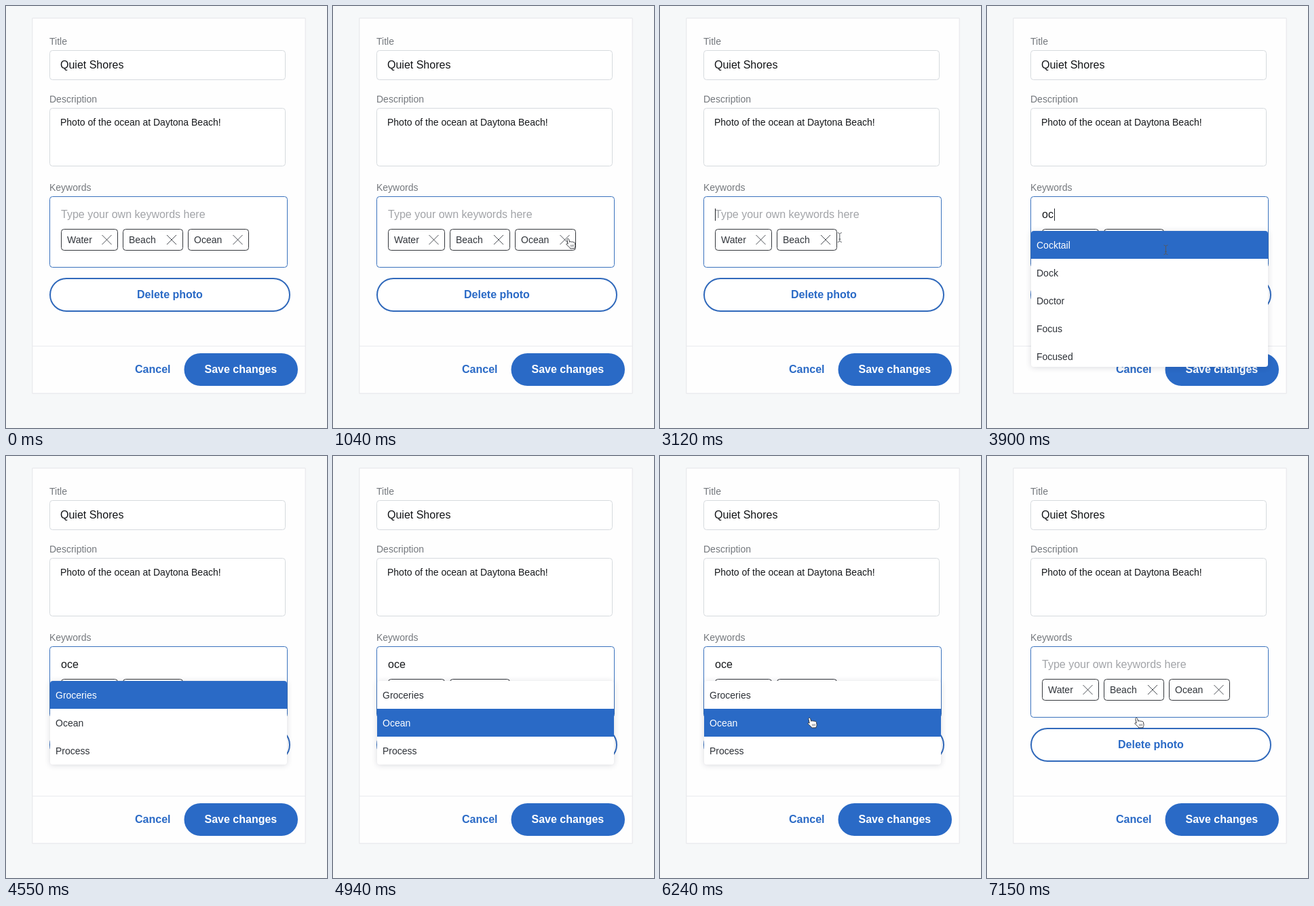
Write an HTML page with a canvas that moves like this. It is 473 px wide and 621 px high and loops after 7.28 s.

```html
<!DOCTYPE html>
<html lang="en">
<head>
<meta charset="utf-8">
<title>Photo keywords</title>
<style>
  html, body { margin: 0; width: 100%; height: 100%; overflow: hidden; background: #f6f8f9; }
  canvas { display: block; width: 473px; height: 621px; }
</style>
</head>
<body>
<canvas id="stage"></canvas>
<script>
const W = 473, H = 621, LOOP = 7280, STEP = 130;
const BLUE = '#2a6ac6';
const FONT = '"Liberation Sans", Arial, sans-serif';
const canvas = document.getElementById('stage');
const ctx = canvas.getContext('2d');
const dpr = window.devicePixelRatio || 1;
canvas.width = W * dpr;
canvas.height = H * dpr;

// Each entry holds from its time until the next one.
const TYPED = [[0, ''], [3510, 'o'], [3640, 'oc'], [4030, 'oce'], [6370, '']];
const CARET = [[0, false], [2080, true], [2600, false], [3120, true], [4550, false],
  [5070, true], [5590, false]];
const LISTS = [[0, null],
  [3900, ['Cocktail', 'Dock', 'Doctor', 'Focus', 'Focused']],
  [4160, ['Groceries', 'Ocean', 'Process']],
  [6370, null]];
const POINTER = [[0, 'none'], [520, 'arrow'], [1040, 'hand'], [1430, 'arrow'],
  [1950, 'beam'], [4030, 'none'], [5460, 'hand']];
const MOVES = [[520, 424, 412], [1040, 343, 341], [1690, 343, 341], [2080, 267, 304],
  [5330, 262, 372], [6110, 217, 384]];

const HAND = new Path2D('M3.2 9.2L1.9 3.2C1.5 1.2 3.9.5 4.6 2.4L5.8 6.4C6.4 5.3 8 5.4 8.4 6.4' +
  'C9.1 5.5 10.5 5.7 10.9 6.8C11.9 6.1 13.2 6.7 13.5 8.2L14 11.4C14.1 13 13.2 13.8 13 15.8' +
  'L6.6 16C5.8 13.6 3.2 12.4 1.2 10.2C.2 9 1.8 8 3.2 9.2Z');
const ARROW = new Path2D('M0 0V13.5L3.1 10.7L5.2 15.6L7.4 14.7L5.3 9.9H9.6Z');

const at = (track, t) => track.filter(k => k[0] <= t).pop()[1];

function position(t) {
  let i = MOVES.findIndex(k => k[0] > t);
  if (i < 0) i = MOVES.length;
  const a = MOVES[Math.max(i - 1, 0)], b = MOVES[Math.min(i, MOVES.length - 1)];
  if (a === b) return [a[1], a[2]];
  let p = (t - a[0]) / (b[0] - a[0]);
  p = p * (2 - p);
  return [a[1] + (b[1] - a[1]) * p, a[2] + (b[2] - a[2]) * p];
}

function text(s, x, y, size, color, bold) {
  ctx.font = (bold ? 'bold ' : '') + size + 'px ' + FONT;
  ctx.fillStyle = color;
  ctx.fillText(s, x, y);
}

// The border lies inside the given edges.
function box(x0, y0, x1, y1, r, fill, stroke, line = 1) {
  const d = stroke ? line / 2 : 0;
  ctx.beginPath();
  ctx.roundRect(x0 + d, y0 + d, x1 - x0 - 2 * d, y1 - y0 - 2 * d, r);
  if (fill) { ctx.fillStyle = fill; ctx.fill(); }
  if (stroke) { ctx.strokeStyle = stroke; ctx.lineWidth = line; ctx.stroke(); }
}

function lines(color, width, ...segments) {
  ctx.beginPath();
  for (const [x0, y0, x1, y1] of segments) { ctx.moveTo(x0, y0); ctx.lineTo(x1, y1); }
  ctx.strokeStyle = color;
  ctx.lineWidth = width;
  ctx.stroke();
}

function tag(label, x0, x1, cross) {
  box(x0, 328, x1, 360, 4, '#fff', '#34373c');
  text(label, x0 + 9, 349, 14, '#30343a');
  lines('#4c5056', 1, [cross - 7, 337, cross + 7, 351], [cross + 7, 337, cross - 7, 351]);
}

function form() {
  ctx.fillStyle = '#f6f8f9';
  ctx.fillRect(0, 0, W, H);
  box(38, 17, 442, 571, 1, '#fefefe', '#ebecef', 1.5);

  text('Title', 64, 57, 14, '#74787d');
  box(64, 65, 412, 109, 4, '#fff', '#d6dade');
  text('Quiet Shores', 80, 92, 16, '#121417');

  text('Description', 64, 142, 14, '#74787d');
  box(64, 150, 412, 236, 4, '#fff', '#d6dade');
  text('Photo of the ocean at Daytona Beach!', 80, 176, 14, '#15171a');

  text('Keywords', 64, 272, 14, '#74787d');
  box(64, 280, 415, 385, 4, '#fff', '#3a72bd');

  box(64, 400, 419, 450, 25, '#fff', '#3069bb', 2);
  text('Delete photo', 193, 430, 16, BLUE, true);

  lines('#e9ebee', 1, [39, 500.5, 441, 500.5]);
  text('Cancel', 190, 540, 16, BLUE, true);
  box(262.5, 511, 430, 559, 24, BLUE);
  text('Save changes', 292.5, 540, 16, '#fff', true);
}

function keywords(t) {
  const typed = at(TYPED, t);
  if (typed) text(typed, 81, 312, 16, '#17191c');
  else text('Type your own keywords here', 81, 312, 16, '#a2a4a8');
  if (at(CARET, t)) {
    ctx.font = '16px ' + FONT;
    const x = Math.round(81 + ctx.measureText(typed).width) + (typed ? 1.5 : 0.5);
    lines('#202327', 1, [x, 298, x, 316]);
  }
  tag('Water', 81, 165, 148.5);
  tag('Beach', 172, 261, 244);
  if (t < 1300 || t >= 6370) tag('Ocean', 268, 358, 341.5);
}

function dropdown(t) {
  const items = at(LISTS, t);
  if (!items) return;
  const bottom = 331 + Math.min(items.length * 41, 200);
  const chosen = t >= 4940 ? 1 : 0;
  ctx.save();
  ctx.shadowColor = 'rgba(30,40,60,.16)';
  ctx.shadowBlur = 8 * dpr;
  ctx.shadowOffsetY = dpr;
  box(65, 331, 414, bottom, 4, '#fff');
  ctx.restore();
  ctx.save();
  ctx.beginPath();
  ctx.roundRect(65, 331, 349, bottom - 331, 4);
  ctx.clip();
  items.forEach((item, i) => {
    const y = 331 + i * 41;
    if (i === chosen) box(65, y, 414, y + 41, 0, BLUE);
    text(item, 73, y + 26, 14, i === chosen ? '#fff' : '#2d3137');
  });
  ctx.restore();
}

function pointer(t) {
  const kind = at(POINTER, t);
  if (kind === 'none') return;
  const [x, y] = position(t);
  ctx.save();
  ctx.translate(x, y);
  ctx.lineJoin = 'round';
  if (kind === 'beam') {
    lines('#55595e', 1, [0.5, -6, 0.5, 6], [-2.5, -7, 0, -6], [3.5, -7, 1, -6],
      [-2.5, 7, 0, 6], [3.5, 7, 1, 6], [-1, 2.5, 2, 2.5]);
  } else if (kind === 'hand') {
    ctx.fillStyle = '#fff';
    ctx.fill(HAND);
    ctx.strokeStyle = '#33363b';
    ctx.lineWidth = 1;
    ctx.stroke(HAND);
    lines('#5d6065', 0.8, [7.4, 10.5, 7.9, 13.5], [9.3, 10.3, 9.7, 13.4], [11.2, 10.2, 11.4, 13.2]);
  } else {
    ctx.strokeStyle = '#fff';
    ctx.lineWidth = 2;
    ctx.stroke(ARROW);
    ctx.fillStyle = '#111';
    ctx.fill(ARROW);
  }
  ctx.restore();
}

function draw(now) {
  const t = Math.floor((now % LOOP) / STEP) * STEP;
  ctx.setTransform(dpr, 0, 0, dpr, 0, 0);
  form();
  keywords(t);
  dropdown(t);
  pointer(t);
}

const start = performance.now();
function tick() {
  draw(performance.now() - start);
  requestAnimationFrame(tick);
}
tick();
</script>
</body>
</html>
```
